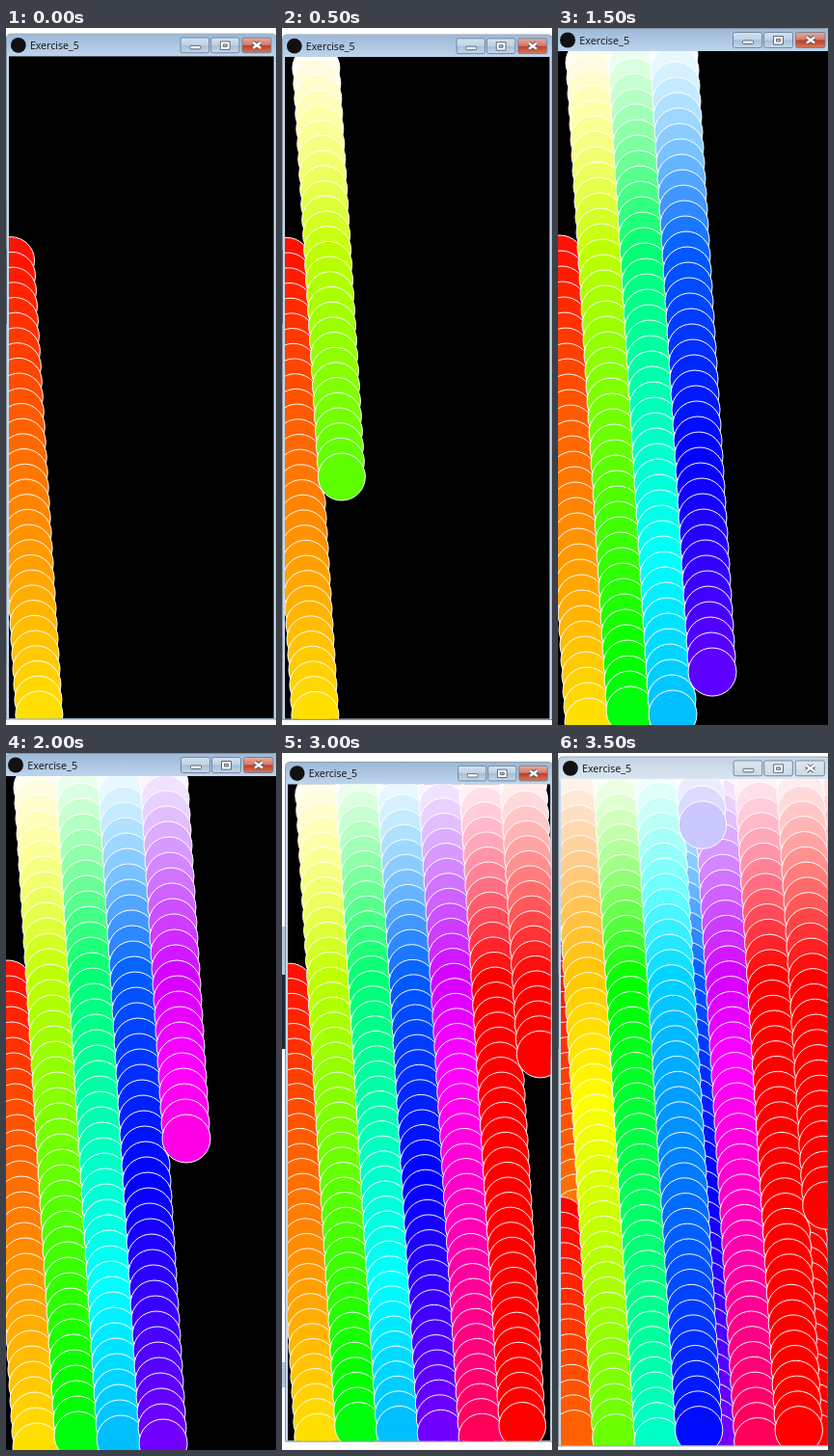
Animation of 280x723 px, one loop 4 s. Source, as an HTML page:

```html
<!DOCTYPE html>
<html lang="en">
<head>
<meta charset="utf-8">
<title>Exercise_5</title>
<style>
  html, body { margin: 0; width: 100%; height: 100%; overflow: hidden; background: #fff; }
  svg { display: block; }
  text { font: 10.8px "Open Sans", "Noto Sans", sans-serif; }
</style>
</head>
<body>
<svg width="280" height="723" viewBox="0 0 280 723">
  <defs>
    <linearGradient id="active" x2="0" y2="1">
      <stop offset="0" stop-color="#9db9d8"/>
      <stop offset="1" stop-color="#bdd4ec"/>
    </linearGradient>
    <linearGradient id="idle" x2="0" y2="1">
      <stop offset="0" stop-color="#c3d3e4"/>
      <stop offset="1" stop-color="#dae5f1"/>
    </linearGradient>
    <linearGradient id="glass" x2="0" y2="1">
      <stop offset="0" stop-color="#d3e1f0"/>
      <stop offset=".48" stop-color="#bfd2e6"/>
      <stop offset=".52" stop-color="#a5bed8"/>
      <stop offset="1" stop-color="#c3d8ec"/>
    </linearGradient>
    <linearGradient id="pale" x2="0" y2="1">
      <stop offset="0" stop-color="#dde7f1"/>
      <stop offset="1" stop-color="#cbd9e8"/>
    </linearGradient>
    <linearGradient id="red" x2="0" y2="1">
      <stop offset="0" stop-color="#e6ab9d"/>
      <stop offset=".48" stop-color="#d4786a"/>
      <stop offset=".52" stop-color="#bd3d27"/>
      <stop offset="1" stop-color="#d8795c"/>
    </linearGradient>
    <clipPath id="view"><rect width="280" height="700"/></clipPath>
  </defs>

  <!-- desktop behind the window -->
  <rect width="280" height="723" fill="#fff"/>
  <path d="M0 180h5v50h-5zM0 632h5v26h-5z" fill="#b9c6d4"/>
  <rect y="230" width="5" height="77" fill="#20262e"/>

  <g id="win">
    <path d="M-2.5 700.8V-18.5q0-5 5-5H277.5q5 0 5 5V700.8z" fill="#c4d9ee" stroke="#4d5a68" stroke-width=".6"/>
    <path id="bar" d="M-2 0V-18.5q0-4.5 4.5-4.5H277.5q4.5 0 4.5 4.5V0z"/>
    <circle cx="10" cy="-11.5" r="8" fill="#111"/>
    <text x="22.3" y="-7.3" fill="#111">Exercise_5</text>
    <g id="buttons" stroke="#6b7f95" stroke-width=".9">
      <rect x="181.5" y="-19.5" width="30" height="16" rx="2"/>
      <rect x="213.5" y="-19.5" width="30" height="16" rx="2"/>
      <rect id="close" x="246.5" y="-19.5" width="30.5" height="16" rx="2"/>
    </g>
    <g fill="#fff" stroke="#4f5a68" stroke-width=".9">
      <rect x="191.5" y="-11" width="11" height="3.5" rx=".8"/>
      <path fill-rule="evenodd" d="M223.500-15.500h10v8.500h-10zM226.500-12.500v2.500h4v-2.500z"/>
    </g>
    <g fill="none">
      <path d="M258-14.500l8 6m0-6l-8 6" stroke="#4f4a55" stroke-width="4.400"/>
      <path d="M258-14.500l8 6m0-6l-8 6" stroke="#fff" stroke-width="2.600"/>
    </g>
    <g clip-path="url(#view)">
      <rect width="280" height="700"/>
      <g id="balls" stroke="#fff"></g>
    </g>
  </g>
</svg>
<script>
const $ = id => document.getElementById(id);
const W = 280, H = 700, RANGE = 220, HOLD = 500;

// Window position, scale, index of the newest ball, focus
const shots = [
  { x: 3, y: 29.2, s: .9815, last: 30, focus: true },
  { x: 3, y: 30, s: .981, last: 58, focus: true },
  { x: 4, y: 32, s: .977, last: 86, focus: true },
  { x: 0, y: 24, s: 1, last: 158, focus: true },
  { x: 0, y: 24, s: 1, last: 185, focus: true },
  { x: 1.3, y: 27.4, s: .9885, last: 212, focus: false },
  { x: 6, y: 32.3, s: .973, last: 267, focus: true },
  { x: 3, y: 27.2, s: .987, last: 1827, focus: false }
];

// Hue follows x, saturation follows y, both capped at RANGE
function color(x, y) {
  const hue = Math.min(x / RANGE, 1) * 6;
  const sat = Math.min(y / RANGE, 1);
  const part = n => {
    const k = (n + hue) % 6;
    return Math.round(255 * (1 - sat * Math.max(0, Math.min(k, 4 - k, 1))));
  };
  return `rgb(${part(5)},${part(3)},${part(1)})`;
}

// The ball wraps at both edges and leaves a trail over several passes
const balls = [];
const count = Math.max(...shots.map(shot => shot.last)) + 1;
for (let i = 0; i < count; i++) {
  const x = (2 + i) % W, y = (216 + 16 * i) % H;
  const ball = document.createElementNS("http://www.w3.org/2000/svg", "circle");
  ball.setAttribute("cx", x);
  ball.setAttribute("cy", y);
  ball.setAttribute("r", 25);
  ball.setAttribute("fill", color(x, y));
  $("balls").append(ball);
  balls.push(ball);
}

let shown = -1;
function draw(time) {
  const n = Math.floor(time / HOLD) % shots.length;
  if (n === shown) return;
  shown = n;
  const { x, y, s, last, focus } = shots[n];
  $("win").setAttribute("transform", `translate(${x} ${y}) scale(${s})`);
  $("bar").setAttribute("fill", focus ? "url(#active)" : "url(#idle)");
  $("buttons").setAttribute("fill", focus ? "url(#glass)" : "url(#pale)");
  $("close").setAttribute("fill", focus ? "url(#red)" : "url(#pale)");
  balls.forEach((b, i) => b.setAttribute("display", i <= last ? "inline" : "none"));
}

const start = performance.now();
function tick() {
  draw(performance.now() - start);
  requestAnimationFrame(tick);
}
tick();
</script>
</body>
</html>
```
